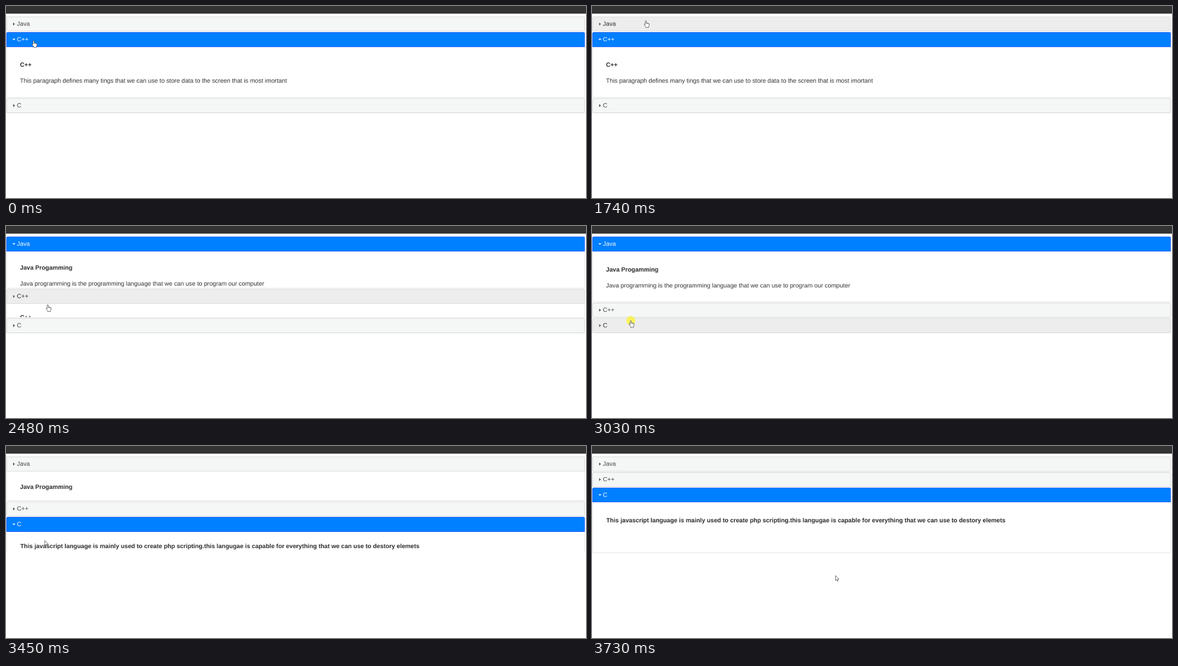
An HTML page that plays this animation: 1280 by 425 pixels, repeating every 3860 ms.

```html
<!DOCTYPE html>
<html lang="en">
<head>
<meta charset="utf-8">
<title>Accordion</title>
<style>
  html, body { margin: 0; width: 100%; height: 100%; overflow: hidden; background: #fff; }
  #page {
    position: absolute; left: 0; top: 0; width: 1524px; height: 506px; background: #fff;
    transform: scale(.8404); transform-origin: 0 0; will-change: transform;
    font: 16px/1.3 "Liberation Sans", Arial, sans-serif;
    text-rendering: geometricPrecision; white-space: nowrap;
  }
  #bar { position: absolute; width: 100%; height: 20px; background: #333; }
  #accordion { position: absolute; left: .6px; top: 28px; width: 1519.4px; }
  .head, .panel { box-sizing: border-box; border: 1px solid; }
  .head {
    position: relative; height: 38.8px; margin-top: 2px; padding: 9px 0 7px 27.2px;
    border-radius: 3px; border-color: #c5c5c5; background: #f5f6f6; color: #454545;
  }
  .head:first-child { margin-top: 0; }
  .head i {
    position: absolute; left: 11.2px; top: 10.4px; width: 16px; height: 16px; background: #444;
    clip-path: polygon(6px 4px, 10.5px 8px, 6px 12px);
  }
  .head.hover { background: #ededed; border-color: #ccc; color: #2b2b2b; }
  .head.hover i { background: #555; }
  .head.open { background: #007fff; border-color: #003eff; color: #fff; border-radius: 3px 3px 0 0; }
  .head.open i { background: #fff; clip-path: polygon(4px 6px, 12px 6px, 8px 10px); }
  .panel {
    overflow: hidden; padding: 0 35.2px; border-color: #ddd; border-top: 0;
    border-radius: 0 0 3px 3px; background: #fff; color: #333;
  }
  .panel > * { position: relative; top: 1.5px; }
  .panel h4 { margin: 21.28px 0; font-size: 16px; color: #2b2b2b; }
  .panel p { margin: 0 0 16px; }
  .panel:last-child h4 { margin-left: .6px; }
  #overlay { position: absolute; left: 0; top: 0; }
  #hand, #arrow { fill: #fff; stroke: #2b2b2b; stroke-width: .85; stroke-linejoin: round; }
</style>
</head>
<body>
<div id="page">
  <div id="bar"></div>
  <div id="accordion">
    <div class="head"><i></i>Java</div>
    <div class="panel">
      <h4>Java Progamming</h4>
      <p>Java programming is the programming language that we can use to program our computer</p>
    </div>
    <div class="head"><i></i>C++</div>
    <div class="panel">
      <h4>C++</h4>
      <p>This paragraph defines many tings that we can use to store data to the screen that is most imortant</p>
    </div>
    <div class="head"><i></i>C</div>
    <div class="panel">
      <h4>This javascript language is mainly used to create php scripting.this langugae is capable for everything that we can use to destory elemets</h4>
    </div>
  </div>
</div>
<svg id="overlay" width="1280" height="425" viewBox="0 0 1280 425">
  <g id="cursor">
    <circle id="click" cx="-.2" cy="0" r="10" fill="#fbf42e" fill-opacity=".75"/>
    <g id="hand">
      <path d="M-1.5 1.3Q-1.4 0-.2 0Q1 0 1.1 1.3V5L3.2 5.3L5.3 5.9L7.2 7V10.6L6 13V15H-.2V13.5L-3.6 9Q-4.2 7.4-3 7.2L-1.5 8.6Z"/>
      <path fill="none" stroke-width=".6" d="M1.1 5V7.4M3.2 5.4V7.6M5.3 6V8"/>
    </g>
    <path id="arrow" d="M0 0V11L2.6 8.7L4.3 12.6L6 11.8L4.3 8.1H7.8Z"/>
  </g>
</svg>
<script>
  const LOOP = 3860, STEP = 70, SCALE = .8404;
  const TOP = 28, HEAD = 38.8, GAP = 2, PANEL = 133.2, PAD = 16, SLIDE = 400;

  const $ = id => document.getElementById(id);
  const heads = [...document.querySelectorAll('.head')];
  const panels = [...document.querySelectorAll('.panel')];

  // Stretches in which the picture advances in steps
  const bursts = [[1320, 1740], [2200, 2620], [3310, 3730]];
  // [first step, last step, x, y] of each cursor move
  const moves = [[1320, 1740, 119, 32.5], [2200, 2620, 85.7, 209.3], [3520, 3730, 537.3, 286.8]];
  // [click, slide start, panel closing, panel opening]
  const slides = [[2200, 2219, 1, 0], [3310, 3271, 0, 2]];
  const clicks = [[330, 590], [2000, 2200], [3030, 3310]];

  const clamp = v => Math.min(1, Math.max(0, v));
  const swing = p => .5 - Math.cos(Math.PI * p) / 2;
  const smooth = p => p * p * (3 - 2 * p);

  function stepped(t) {
    for (const [a, b] of bursts)
      if (t >= a && t < b + STEP) return a + STEP * Math.floor((t - a) / STEP);
    return t;
  }

  function cursorAt(t) {
    let x = 61.2, y = 76.7;
    for (const [a, b, toX, toY] of moves) {
      if (t < a) break;
      const p = smooth(clamp((t - a + STEP) / (b - a + STEP)));
      x += (toX - x) * p;
      y += (toY - y) * p;
    }
    return [x, y];
  }

  function accordionAt(t) {
    let open = 1, size = [0, 1, 0];
    for (const [click, start, from, to] of slides) {
      if (t < click) break;
      const p = swing(clamp((t - start) / SLIDE));
      open = to;
      size = [0, 0, 0];
      size[from] = 1 - p;
      size[to] = p;
    }
    return { open, size };
  }

  function draw(now) {
    const time = now % LOOP, t = stepped(time);
    const [x, y] = cursorAt(t);
    const { open, size } = accordionAt(t);

    let top = TOP, over = -1;
    size.forEach((f, i) => {
      if (y >= top * SCALE && y <= (top + HEAD) * SCALE + 5) over = i;
      top += HEAD + PANEL * f + GAP;
      const s = panels[i].style;
      s.display = f > .001 ? 'block' : 'none';
      s.height = PANEL * f + 'px';
      s.paddingTop = s.paddingBottom = PAD * f + 'px';
    });
    panels[2].style.borderBottomColor = size[2] < 1 ? 'transparent' : '';

    heads.forEach((h, i) => {
      h.classList.toggle('open', i === open);
      h.classList.toggle('hover', i === over && i !== open);
    });

    $('cursor').setAttribute('transform', `translate(${x} ${y})`);
    $('hand').style.display = over < 0 ? 'none' : '';
    $('arrow').style.display = over < 0 ? '' : 'none';
    $('click').style.display = clicks.some(([a, b]) => time >= a && time < b) ? '' : 'none';
  }

  const start = performance.now();
  function tick() {
    draw(performance.now() - start);
    requestAnimationFrame(tick);
  }
  tick();
</script>
</body>
</html>
```
